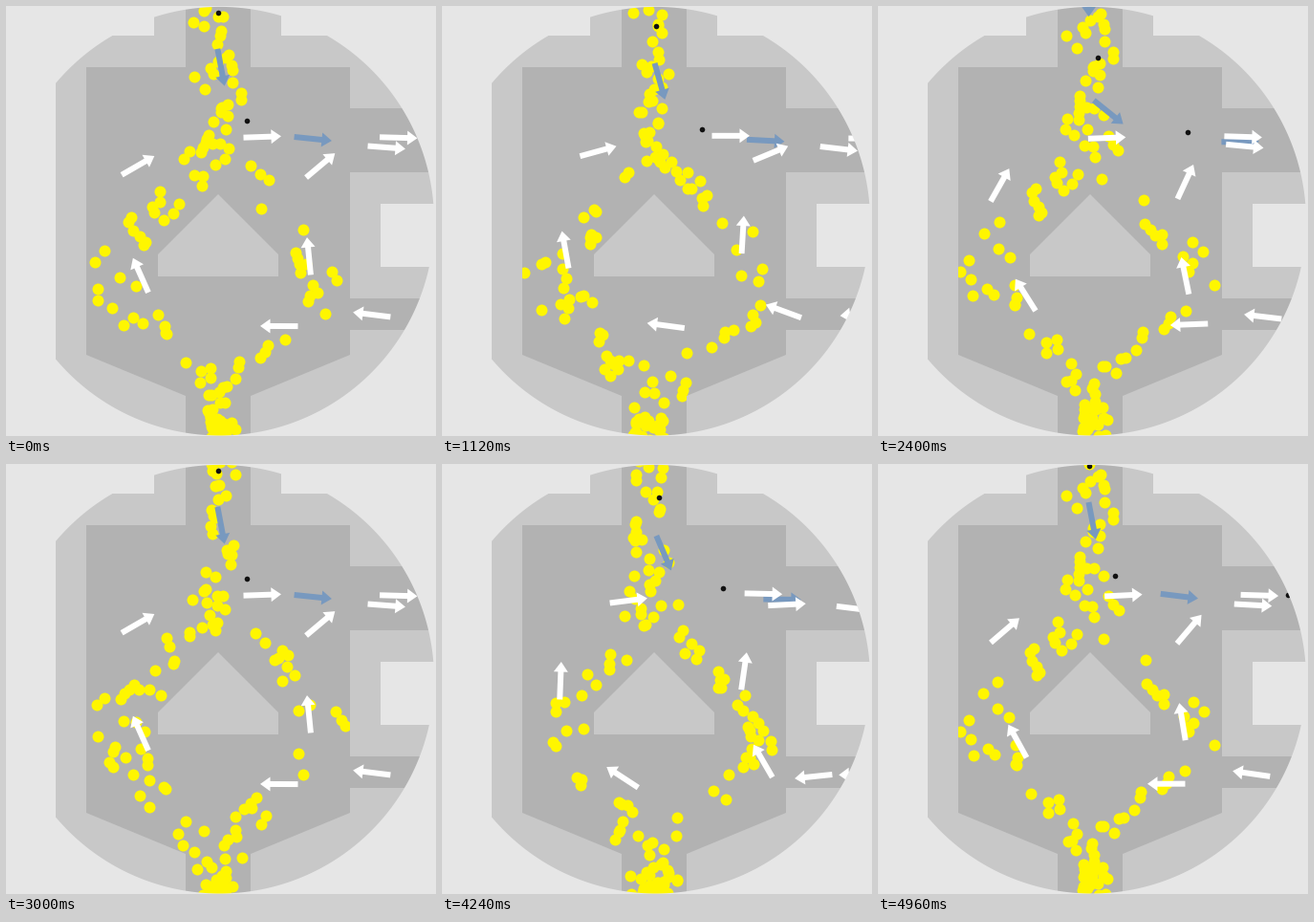
Recreate the animation shown at these times as a matplotlib script. Size 450 px wide and 450 px high, loop 5000 ms.

```python
import numpy as np
import matplotlib.pyplot as plt
from matplotlib.animation import FuncAnimation
from matplotlib.collections import PolyCollection
from matplotlib.patches import PathPatch, Polygon
from matplotlib.path import Path

SIZE, DPI = 450, 100
FRAMES, STEP_MS = 125, 40
OUTSIDE, SHELL, CHAMBER = "#e6e6e6", "#c8c8c8", "#b2b2b2"
YELLOW, BLUE = "#fff600", "#7899bf"

# Periods in frames
AIR, HEAVY, GRAIN = 12.5, 25, 63.75

# Key points of each track: time in frames, x, y
LONG_AIR = np.array([
    (0, 484, 317), (6, 389, 327), (12.5, 286, 335), (18.5, 189, 328),
    (25, 141, 282), (31, 124, 227), (37.5, 138, 167), (43.5, 195, 143),
    (50, 268, 137), (67, 462, 139)])
SHORT_AIR = np.array([
    (0, 484, 323), (12.5, 383, 323), (18.5, 336, 311), (25, 317, 262),
    (31, 316, 217), (37.5, 329, 167), (43, 358, 148), (50, 398, 148),
    (60, 455, 154)])
BLUE_AIR = np.array([
    (4, 220, -38), (25, 225, 64), (31, 232, 93), (35, 241, 111),
    (43, 280, 132), (50, 321, 139), (72, 448, 141)])
SPECK = np.array([
    (-3, 219, -7), (10, 230, 54), (24.5, 249, 119), (28, 272, 129),
    (51, 444, 138)])
FALL = np.array([(0, -8), (12, 130), (26, 245), (49, 430), (60, 457)])

ARROW = np.array([(-19.5, -3), (9.5, -3), (9.5, -7.5), (20, 0),
                  (9.5, 7.5), (9.5, 3), (-19.5, 3)])


def smooth(track, t):
    """Point on a cubic Hermite curve through the track's keys."""
    keys, points = track[:, 0], track[:, 1:]
    slope = np.gradient(points, keys, axis=0)
    i = np.clip(np.searchsorted(keys, t) - 1, 0, len(keys) - 2)
    h = keys[i + 1] - keys[i]
    u = (t - keys[i]) / h
    return ((1 + 2 * u) * (1 - u) ** 2 * points[i]
            + u * (1 - u) ** 2 * h * slope[i]
            + u * u * (3 - 2 * u) * points[i + 1]
            + u * u * (u - 1) * h * slope[i + 1])


def times_on(track, frame, period):
    """Times of every copy that is on the track now."""
    start, end = track[0, 0], track[-1, 0]
    return np.arange(start + (frame - start) % period, end, period)


def arrows(track, frame, period):
    shapes = []
    for t in times_on(track, frame, period):
        # The heading runs slightly ahead of the position
        dx, dy = smooth(track, t + 2) - smooth(track, t + 1)
        c, s = np.array([dx, dy]) / np.hypot(dx, dy)
        shapes.append(ARROW @ np.array([(c, s), (-s, c)]) + smooth(track, t))
    return shapes


def specks_at(frame):
    t = times_on(SPECK, frame, HEAVY)
    return np.column_stack([np.interp(t, SPECK[:, 0], SPECK[:, k])
                            for k in (1, 2)])


def make_grains(groups=76):
    """Small clusters that share a lane: entry time, side, offset."""
    rng = np.random.default_rng(5)
    rows = []
    for g in range(groups):
        entry = (g + rng.uniform(-0.5, 0.5)) * GRAIN / groups
        side = rng.choice([-1, 1])
        offset = rng.uniform(-1, 1)
        for k in range(rng.choice([1, 2, 3], p=[0.35, 0.4, 0.25])):
            rows.append((entry + k * rng.uniform(0.6, 1.3), side,
                         np.clip(offset + rng.normal(0, 0.3), -1.2, 1.2)))
    return np.array(rows).T


ENTRY, SIDE, OFFSET = make_grains()


def grains(frame):
    """The stream parts around the roof and closes again below it."""
    y = np.interp((frame - ENTRY) % GRAIN, *FALL.T)
    bulge = np.sin(np.pi * np.clip((y - 130) / 300, 0, 1)) ** 2
    reach = np.where(SIDE > 0, 108, 98)
    spread = 18 + np.where(SIDE > 0, 2, 10) * bulge
    x = 221 + SIDE * (3 + reach * bulge) + OFFSET * spread
    return np.column_stack([x, y])


fig = plt.figure(figsize=(SIZE / DPI, SIZE / DPI), dpi=DPI, facecolor=OUTSIDE)
ax = fig.add_axes([0, 0, 1, 1])
ax.set(xlim=(0, SIZE), ylim=(SIZE, 0))
ax.axis("off")


def area(points, color):
    return ax.add_patch(Polygon(points, facecolor=color, lw=0, zorder=1))


def dots(diameter, color, z):
    size = (diameter * 72 / DPI) ** 2
    return ax.scatter([], [], s=size, c=color, linewidths=0, zorder=z)


def arrow_layer(color, z):
    layer = PolyCollection([], facecolors=color, linewidths=0, zorder=z)
    ax.add_collection(layer, autolim=False)
    return layer


area([(155, 0), (288, 0), (288, 31), (450, 31), (450, 207), (392, 207),
      (392, 273), (450, 273), (450, 450), (52, 450), (52, 31), (155, 31)],
     SHELL)
chamber = area([(188, -5), (256, -5), (256, 64), (360, 64), (360, 107),
                (450, 107), (450, 174), (360, 174), (360, 306), (450, 306),
                (450, 339), (360, 339), (360, 365), (256, 408), (256, 455),
                (188, 455), (188, 408), (84, 365), (84, 64), (188, 64)],
               CHAMBER)
area([(222, 197), (285, 260), (285, 283), (159, 283), (159, 260)], SHELL)

# Everything outside the round window is covered
angle = np.linspace(2 * np.pi, 0, 400)
window = np.column_stack([223.7 + 224.3 * np.cos(angle),
                          225.2 + 224.3 * np.sin(angle)])
frame_box = [(-5, -5), (455, -5), (455, 455), (-5, 455), (-5, -5)]
cover = Path.make_compound_path(Path(frame_box), Path(window))
ax.add_patch(PathPatch(cover, facecolor=OUTSIDE, lw=0, zorder=9))

grain_dots = dots(12, YELLOW, 2)
grain_dots.set_clip_path(chamber)
blue_layer = arrow_layer(BLUE, 3)
white_layer = arrow_layer("white", 4)
specks = dots(5.6, "#111111", 5)


def update(frame):
    grain_dots.set_offsets(grains(frame))
    blue_layer.set_verts(arrows(BLUE_AIR, frame, HEAVY))
    white_layer.set_verts(arrows(LONG_AIR, frame, AIR)
                          + arrows(SHORT_AIR, frame, AIR))
    specks.set_offsets(specks_at(frame))
    return grain_dots, blue_layer, white_layer, specks


anim = FuncAnimation(fig, update, frames=FRAMES, interval=STEP_MS,
                     repeat=True, repeat_delay=0)
plt.show()
```
